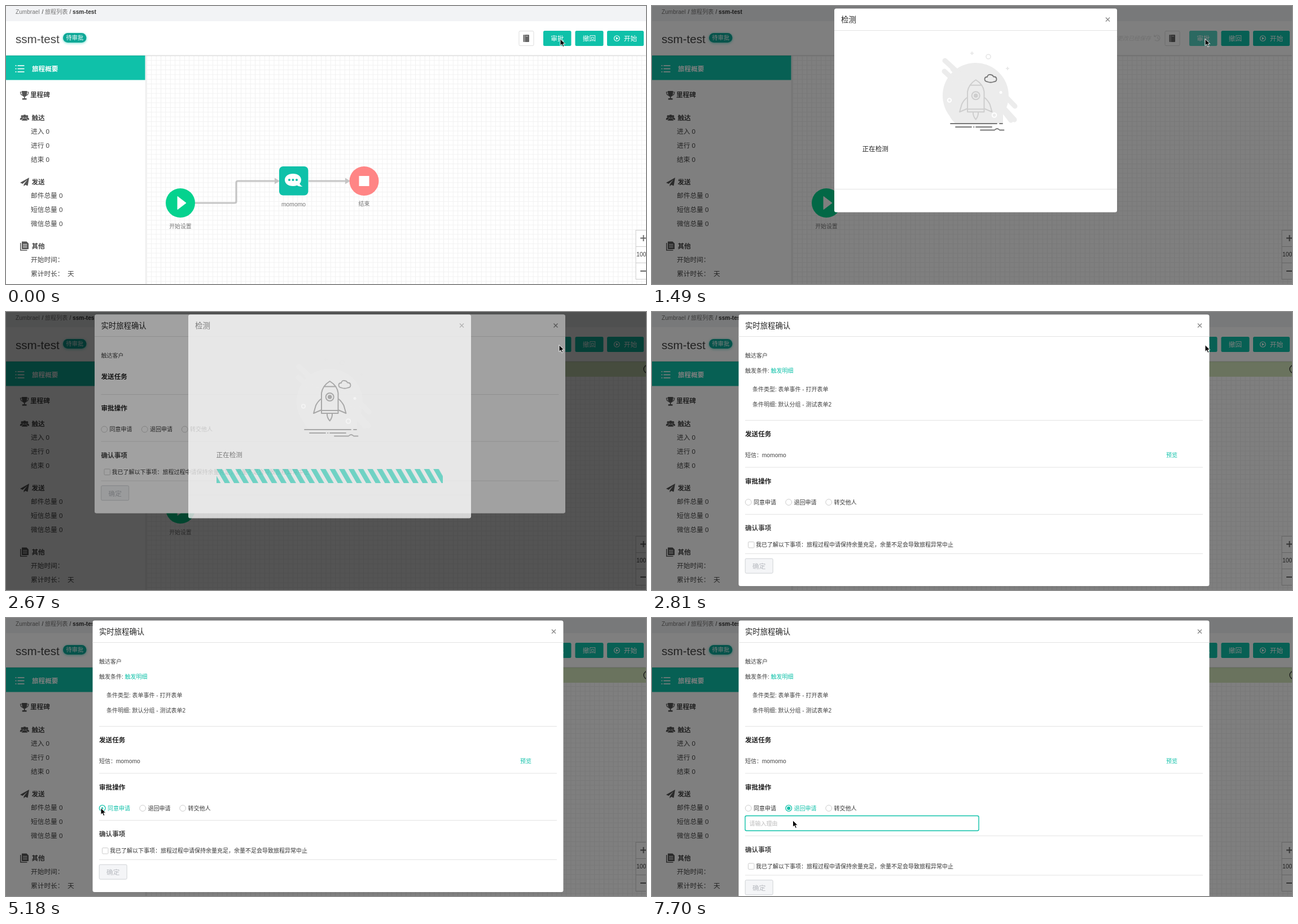
Write an HTML page that moves like this. It is 1134 px wide and 494 px high and loops after 8 s.

```html
<!DOCTYPE html>
<html lang="zh">
<head>
<meta charset="utf-8">
<title>Journey approval</title>
<style>
html, body { margin: 0; width: 100%; height: 100%; overflow: hidden; background: #fff; }
svg { display: block; width: 1134px; height: 494px; }
text { font-family: 'Liberation Sans', 'Noto Sans CJK SC', 'Noto Sans CJK', sans-serif; white-space: pre; }
</style>
</head>
<body>
<svg id="stage" viewBox="0 0 1134 494" xmlns="http://www.w3.org/2000/svg"></svg>
<script>
const TEAL = '#0fc1a9', INK = '#444', LINE = '#e3e3e3';
const $ = id => document.getElementById(id);

// Markup helpers; text is placed by its vertical centre.
const txt = (x, cy, size, s, fill = INK, extra = '') =>
  `<text x="${x}" y="${cy + size * 0.37}" font-size="${size}" fill="${fill}" ${extra}>${s}</text>`;
const bold = (x, cy, s, fill = INK) => txt(x, cy, 11.6, s, fill, 'font-weight="700"');
const mid = 'text-anchor="middle"';
const rect = (x, y, w, h, fill, extra = '') =>
  `<rect x="${x}" y="${y}" width="${w}" height="${h}" fill="${fill}" ${extra}/>`;
const disc = (x, y, r, fill, extra = '') => `<circle cx="${x}" cy="${y}" r="${r}" fill="${fill}" ${extra}/>`;
const path = (d, fill, extra = '') => `<path d="${d}" fill="${fill}" ${extra}/>`;
const line = (d, color = LINE, w = 1, extra = '') => path(d, 'none', `stroke="${color}" stroke-width="${w}" ${extra}`);
const group = (id, body, extra = '') => `<g id="${id}" ${extra}>${body}</g>`;
const round = 'stroke-linecap="round" stroke-linejoin="round"';

const defs = `<defs>
  <pattern id="grid" x="249" y="88" width="8.35" height="8.35" patternUnits="userSpaceOnUse">
    ${line('M0 .5H8.35M.5 0V8.35', '#f1f1f1')}</pattern>
  <pattern id="stripes" width="16.7" height="30" patternUnits="userSpaceOnUse"
    patternTransform="translate(373 279) skewX(30)">${rect(0, 0, 9.6, 30, TEAL)}</pattern>
  <filter id="glow" x="-30%" y="-60%" width="160%" height="220%">
    <feDropShadow dx="0" dy="1" stdDeviation="2.2" flood-color="${TEAL}" flood-opacity=".6"/></filter>
  <filter id="soft" x="-5%" y="-20%" width="110%" height="150%">
    <feDropShadow dx="0" dy="1" stdDeviation="1.5" flood-color="#000" flood-opacity=".14"/></filter>
</defs>`;

function header() {
  const button = (x, w, s, tx, id = '') =>
    rect(x, 44, w, 27, TEAL, `rx="2.5" ${id}`) + txt(tx, 57.5, 11.7, s, '#fff', mid + ' font-weight="500"');
  return rect(0, 27, 1134, 60, '#fff', 'filter="url(#soft)"') + rect(0, 0, 1134, 27, '#f2f3f5') +
    txt(17, 10.5, 10.1, 'Zumbrael', '#777') + txt(63.5, 10.5, 10.1, '/', '#333') +
    txt(69, 10.5, 10.1, '旅程列表', '#777') + txt(112.5, 10.5, 10.1, '/', '#333') +
    txt(118, 10.5, 10.2, 'ssm-test', '#333', 'font-weight="700"') +
    txt(17, 58, 20.6, 'ssm-test', INK) +
    rect(101, 48, 41.5, 17, '#11a897', 'rx="8.5" filter="url(#glow)"') +
    txt(121.8, 56.5, 10.2, '待审批', '#fff', mid + ' font-weight="500"') +
    group('saved', txt(884, 57, 10, '所有更改已经保存', '#555', 'text-anchor="end" font-style="italic"') +
      line('M891 54A5 5 0 1 1 891 60M890 51V54.5H893.5M896 54V57.5L898.5 59', '#555', 1.2)) +
    rect(909, 44.5, 26, 26, '#fff', 'rx="2" stroke="#ddd"') +
    rect(916.5, 51, 10.5, 13, '#666', 'rx="1"') + line('M919 51V64', '#ddd', .8) +
    rect(921, 53, 4, 1.2, '#bbb') +
    button(952, 49.5, '审批', 977, 'id="approve"') + button(1008.5, 50, '撤回', 1033.5) +
    button(1065, 65, '开始', 1106.5) +
    disc(1082.3, 57.5, 4.8, 'none', 'stroke="#fff" stroke-width="1.1"') + path('M1080.8 55L1085 57.5L1080.8 60Z', '#fff');
}

function sidebar() {
  const rows = [[222.5, '进入 0'], [247.5, '进行 0'], [272.5, '结束 0'], [337, '邮件总量 0'], [362, '短信总量 0'],
    [386.5, '微信总量 0'], [450.5, '开始时间：'], [475.5, '累计时长：  天']];
  const heads = [[43, 158, '里程碑'], [45.5, 199, '触达'], [45.5, 313, '发送'], [45.5, 427, '其他']];
  const person = (x, y, r) => disc(x, y, r, '#555') +
    path(`M${x - r * 1.8} ${y + r * 3}q0 ${-r * 2} ${r * 1.8} ${-r * 2}t${r * 1.8} ${r * 2}z`, '#555');
  return rect(246, 88, 3, 406, '#f0f0f0') + rect(0, 88, 246.5, 406, '#fff') + rect(0, 88, 246.5, 43.5, TEAL) +
    [106, 111.5, 117].map(y => rect(16.5, y - .8, 2, 1.6, '#fff') + rect(20.5, y - .8, 12, 1.6, '#fff')).join('') +
    bold(46, 111.5, '旅程概要', '#fff') +
    heads.map(([x, y, s]) => bold(x, y, s)).join('') + rows.map(([y, s]) => txt(44, y, 11.7, s)).join('') +
    path('M28 151H37.5Q37.5 161 33.6 161V164H36.5V166.5H28.8V164H31.8V161Q28 161 28 151Z', '#555') +
    line('M28 153H25.5Q25.5 158 30 159M37.5 153H39.8Q39.8 158 35.5 159', '#555', 1.2) +
    person(28.5, 196, 2.1) + person(37.3, 196, 2.1) +
    path('M27.5 204Q28.5 199 33 199T38.5 204Z', '#555', 'stroke="#fff" stroke-width=".7"') + disc(33, 196, 3, '#555') +
    path('M41 305L25 314L29.5 316L38 308.5L31.5 317V320.5L34 317.8L38.5 319.5Z', '#555') +
    path('M28 418.5H36.5L40 422V432H28Z', '#555') + line('M25.8 421V434H37.5', '#555', 1.5) +
    line('M30 423.5H37.5M30 426H37.5M30 428.5H37.5', '#fff', .9);
}

function flow() {
  const label = (x, y, size, s) => txt(x, y, size, s, '#777', mid);
  return rect(249, 88, 885, 406, '#fff') + rect(249, 88, 885, 406, 'url(#grid)') +
    line('M335 350H405Q408 350 408 347V314Q408 311 411 311H478M536 311H603', '#c5c5c5', 3.2) +
    path('M476 305.5L485 311L476 316.5ZM601 305.5L610 311L601 316.5Z', '#c5c5c5') +
    disc(309, 350, 26, '#05d28e') + path('M304 338.5L319 350L304 361.5Z', '#fff', 'stroke="#fff" stroke-linejoin="round"') +
    rect(484, 285, 51.5, 51.5, TEAL, 'rx="7"') +
    path('M508.5 298C517 298 523 302.5 523 309Q523 313 520.3 315.7Q521.5 319 525.5 320.5Q519.5 321.5 515.5 318.7Q512.5 320 508.5 320C500 320 494 315.5 494 309S500 298 508.5 298Z', '#fff') +
    [502, 508.5, 515].map(x => disc(x, 309, 2.1, TEAL)).join('') +
    disc(634.5, 311, 26, '#ff8585') + rect(625.5, 302, 18, 18, '#fff') +
    label(309, 391, 9.9, '开始设置') + label(509.5, 352, 10.3, 'momomo') + label(634.5, 351.5, 9.9, '结束') +
    group('alert', rect(249, 88, 885, 27, '#d5e8bd') + disc(1137, 101.5, 7, 'none', 'stroke="#444" stroke-width="1.5"')) +
    rect(1116, 398.5, 30, 87, '#fff', 'stroke="#ccc"') + line('M1116 427.5H1134M1116 456.5H1134', '#ccc') +
    line('M1124 412.5H1134M1129.5 407V418M1124 471H1134', '#666', 1.8) + txt(1117, 441.5, 10.4, '100%', INK);
}

const cross = x => line(`M${x - 3.5} 20.5l7 7m0 -7l-7 7`, '#888', 1.4);

function checkDialog() {
  const DARK = '#767676';
  const ink = (d, w = 2) => line(d, DARK, w, round);
  const spark = (x, y) => `M${x - 3} ${y}h6M${x} ${y - 3}v6`;
  const art = path('M527 195A58.5 58.5 0 1 1 622 192L622 208H537Q531 203 527 195Z', '#ececec') +
    line('M518 116L533 130M519 97L545 121M533 112L552 130M534 112L536 113', '#ececec', 9, round) +
    line('M616 150L643 178M612 172L636 203M622 180L642 202', '#ececec', 9, round) +
    line(spark(567, 84) + spark(630, 111), '#e6e6e6', 1.6) +
    disc(596, 90, 4, 'none', 'stroke="#e6e6e6" stroke-width="1.6"') +
    disc(527, 167.5, 3.2, '#ececec', 'stroke="#fff" stroke-width="2"') +
    disc(606.5, 194, 3.8, '#ececec', 'stroke="#fff" stroke-width="2"') + disc(618, 153.5, 2.5, '#fff') +
    path('M594 134.5Q589.5 134 589.5 130T594 126Q595 121.5 599.5 122T605 125.5Q610.5 125.5 610.5 130T606 134.5Q600 137 594 134.5Z',
      '#ececec', `stroke="${DARK}" stroke-width="1.8"`) +
    ink('M529 209H611M616 209H621M538 215H566M570 215H570.5M574 215H602M582 220.5H607Q611.5 215.5 616 220.5H623.5', 1.8);
  const rocket = ink('M559 180V144Q561 131 573.7 123Q587 131 588.5 144V180ZM564 132.5H583.5M559 175H588.5' +
    'M559 154Q553 158 549 166L545 180L559 174M588.5 154Q594 158 598.5 166L602.5 180L588.5 174' +
    'M569 181Q568.5 187 573.7 193.5Q578.5 187 578 181') +
    disc(573.7, 151, 7, 'none', `stroke="${DARK}" stroke-width="2"`) + disc(573.7, 151, 3.8, DARK);
  return rect(323, 4.5, 501, 362, '#fff', 'id="checkBack" rx="3.5"') +
    group('checkBody', txt(335, 24, 13.4, '检测', '#222') + cross(807.5) +
      line('M323 43.5H824M323 325.5H824') + art + group('rocket', rocket) +
      txt(372.5, 253.5, 11.6, '正在检测', '#222') + rect(373, 279, 0, 25, 'url(#stripes)', 'id="bar"'));
}

function confirmDialog() {
  const rule = y => line(`M165 ${y}H976`);
  const radio = (i, x, s) => disc(x, 338, 5.4, '#fff', `id="ring${i}"`) + disc(x, 338, 0, TEAL, `id="dot${i}"`) +
    txt(x + 9.3, 338, 10, s, '#333', `id="opt${i}"`);
  return rect(153.5, 4.5, 834, 482.5, '#fff', 'id="panel" rx="3.5"') +
    txt(165, 24, 13.35, '实时旅程确认', '#222') + cross(970.5) + line('M153.5 43.5H987.5') +
    txt(165, 77.5, 10, '触达客户', '#444') +
    group('details', txt(165, 104, 10, '触发条件:') + txt(210.5, 104, 10, '触发明细', TEAL) +
      txt(178, 137.5, 10, '条件类型: 表单事件 - 打开表单') + txt(178, 164, 10, '条件明细: 默认分组 - 测试表单2') + rule(192.5) +
      txt(165, 254, 10, '短信：') + txt(194.8, 254, 10.3, 'momomo') + txt(911, 254, 10, '预览', TEAL)) +
    group('tasks', bold(165, 217, '发送任务', '#222')) +
    group('review', rule(276) + bold(165, 300.5, '审批操作', '#222') +
      radio(0, 170.7, '同意申请') + radio(1, 242.2, '退回申请') + radio(2, 313.2, '转交他人') +
      group('reason', rect(165, 351.5, 414, 26.5, '#fff', 'id="field" rx="2.5" stroke-width="1.4"') +
        txt(172.5, 365, 10, '请输入理由', '#bbb') + line('M173 359V371', '#333', 1, 'id="caret"'))) +
    group('notice', rule(359.5) + bold(165, 384, '确认事项', '#444') +
      rect(170.5, 408.5, 10.5, 10.5, '#fff', 'rx="1.5" stroke="#ccc"') +
      txt(184, 413.5, 10, '我已了解以下事项：旅程过程中请保持余量充足，余量不足会导致旅程异常中止', '#333') + rule(429.5) +
      rect(165.2, 438.2, 49, 26, '#f4f5f7', 'rx="2" stroke="#cfd2d6"') + txt(189.7, 452, 11.6, '确定', '#b8bbc0', mid));
}

$('stage').innerHTML = defs + flow() + sidebar() + header() +
  rect(0, 0, 1134, 494, '#000', 'id="shade"') +
  group('confirm', confirmDialog()) + rect(157, 4.5, 834, 353, '#000', 'id="veil" rx="3.5" opacity=".37"') +
  group('check', checkDialog()) +
  group('cursor', path('M0 0V12L2.8 9.4L4.8 14L6.9 13.1L5 8.7H8.8Z', '#000', 'stroke="#fff" stroke-width="1"'));

const set = (id, attrs) => { for (const a in attrs) $(id).setAttribute(a, attrs[a]); };
const show = (id, on) => set(id, { visibility: on ? 'inherit' : 'hidden' });
const move = (id, x, y) => set(id, { transform: `translate(${x} ${y})` });
const clamp = v => Math.max(0, Math.min(1, v));
const ease = v => (1 - Math.cos(Math.PI * clamp(v))) / 2;

// Pointer keys: step, x, y
const route = [[0, 982, 58.5], [1, 980, 58.5], [21, 980, 58.5], [22, 820, 110], [23, 350, 250], [24, 222.5, 299.5],
  [26, 192, 322], [29, 169, 336.5], [30, 168, 337.5], [36, 168, 337.5], [38, 182, 339], [42, 242.5, 336.5],
  [44, 242.5, 336.5], [48, 253, 360], [50, 253, 360], [52, 249.5, 359.5]];

function pointer(k) {
  const i = route.findIndex(p => p[0] >= k);
  if (i < 0) return route[route.length - 1].slice(1);
  if (i === 0) return route[0].slice(1);
  const [a, b] = [route[i - 1], route[i]], f = (k - a[0]) / (b[0] - a[0]);
  return [1, 2].map(j => a[j] + (b[j] - a[j]) * f);
}

function render(ms) {
  const k = Math.floor(ms / 148 + 0.1); // the screen refreshes in steps of 148 ms
  const swap = k === 18, open = k >= 18;

  set('approve', { fill: k >= 9 && !open ? '#57d3c3' : TEAL });
  set('saved', { opacity: clamp((k - 9) / 6) });
  show('alert', open);
  set('shade', { opacity: k < 9 ? 0 : k === 9 ? 0.25 : swap ? 0.67 : 0.5 });

  show('check', k >= 9 && k <= 18);
  set('check', { opacity: k === 9 ? 0.5 : 1 });
  set('checkBack', { opacity: swap ? 0.75 : 1 });
  set('checkBody', { opacity: swap ? 0.55 : 1 });
  const lift = clamp((k - 8) / 8);
  set('rocket', { opacity: lift });
  move('rocket', 0, 11 * (1 - lift));
  set('bar', { width: 401 * ease((k * 148 - 1490) / 1130) });

  const picked = k >= 43 ? 1 : k >= 35 ? 0 : -1;
  const hover = k >= 41 && k < 43 ? 1 : -1;
  const extra = k >= 43 ? 27.5 : 0, fold = swap ? -129.5 : 0;
  show('confirm', open);
  show('veil', swap);
  show('details', !swap);
  show('reason', k >= 43);
  move('confirm', swap ? 3.5 : 0, 0);
  move('tasks', 0, swap ? -102.5 : 0);
  move('review', 0, fold);
  move('notice', 0, fold + extra);
  set('panel', { height: 482.5 + fold + extra });
  for (let i = 0; i < 3; i++) {
    const on = i === picked, lit = on || i === hover;
    set('ring' + i, { stroke: lit ? TEAL : '#ccc', 'stroke-width': on ? 1.3 : 1 });
    set('dot' + i, { r: on ? (k === 35 ? 1.8 : 3.1) : 0 });
    set('opt' + i, { fill: lit ? TEAL : '#333', 'font-weight': on ? 500 : 400 });
  }
  set('field', { stroke: k >= 47 ? TEAL : '#d4d7db' });
  show('caret', k >= 48 && k <= 50);
  move('cursor', ...pointer(k));
}

const start = performance.now();
function frame() {
  render((performance.now() - start) % 8000);
  requestAnimationFrame(frame);
}
frame();
</script>
</body>
</html>
```
